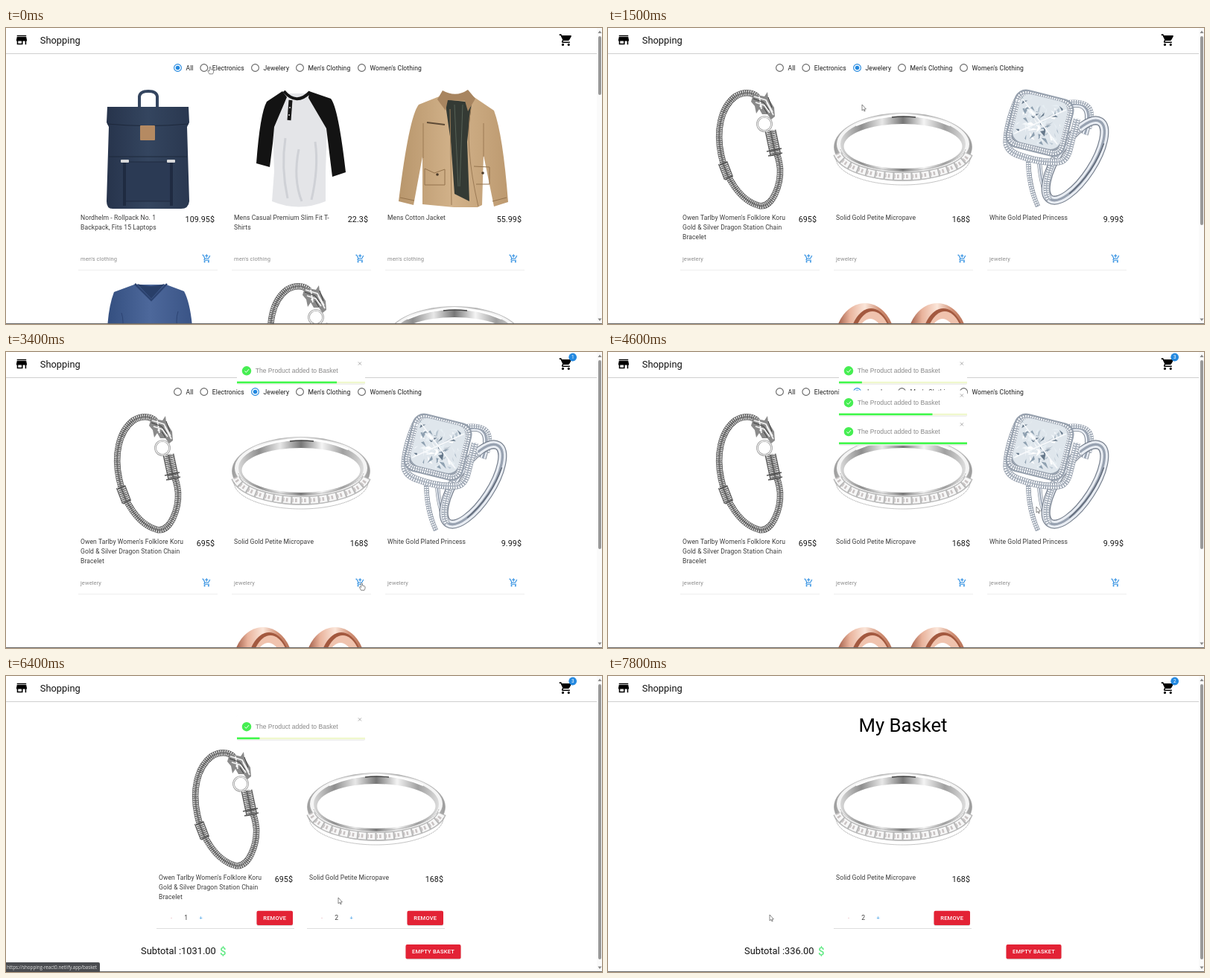
These frames come from a looping animation (800 by 398 pixels, 8000 ms). An HTML page:

```html
<!DOCTYPE html>
<html lang="en">
<head>
<meta charset="utf-8">
<title>Shopping</title>
<style>
html, body { margin: 0; width: 100%; height: 100%; overflow: hidden; background: #fff; }
svg { display: block; width: 800px; height: 398px; font-family: Roboto, sans-serif; }
.b1 { font-size: 8.57px; letter-spacing: .00938em; fill: #3c3c3c; }
.b2 { font-size: 7.5px; letter-spacing: .01071em; fill: #8d8d8d; }
.h6 { font-size: 10.7px; letter-spacing: .0075em; fill: #151515; text-anchor: end; }
.h5 { font-size: 12.86px; fill: #111; }
.h3 { font-size: 25.7px; text-anchor: middle; }
.btn { font-size: 7.5px; font-weight: 500; letter-spacing: .02857em; fill: #fff; text-anchor: middle; }
.toast { font-family: "Liberation Sans", sans-serif; font-size: 8.57px; fill: #8a8a8a; }
.mid { text-anchor: middle; }
</style>
</head>
<body>
<svg id="stage" viewBox="0 0 800 398"></svg>
<script>
const LOOP = 8000, BLUE = '#2489e0';
const stage = document.getElementById('stage');

const text = (x, y, s, cls, more = '') => `<text x="${x}" y="${y}" class="${cls}" ${more}>${s}</text>`;
const rect = (x, y, w, h, fill, r = 0) => `<rect x="${x}" y="${y}" width="${w}" height="${h}" rx="${r}" fill="${fill}"/>`;
const shape = (d, fill) => `<path d="${d}" fill="${fill}"/>`;
const line = (d, color, w = 1, more = '') =>
  `<path d="${d}" fill="none" stroke="${color}" stroke-width="${w}" ${more}/>`;
const dot = (x, y, r, fill, more = '') => `<circle cx="${x}" cy="${y}" r="${r}" fill="${fill}" ${more}/>`;
const oval = (x, y, rx, ry, fill, more = '') =>
  `<ellipse cx="${x}" cy="${y}" rx="${rx}" ry="${ry}" fill="${fill}" ${more}/>`;
const at = (x, y, body, scale = 1) => `<g transform="translate(${x} ${y}) scale(${scale})">${body}</g>`;
const turn = (x, y, deg, body) => `<g transform="translate(${x} ${y}) rotate(${deg})">${body}</g>`;
const use = (id, x, y) => `<use href="#${id}" x="${x}" y="${y}"/>`;
const grad = (id, dir, ...colors) => `<linearGradient id="${id}" ${dir}>` +
  colors.map((c, i) => `<stop offset="${i / (colors.length - 1)}" stop-color="${c}"/>`).join('') + '</linearGradient>';

let seed = 7;
const rnd = () => (seed = seed * 16807 % 2147483647) / 2147483647;

// Small stones, woven chain and polished metal along a path
const pave = (d, w) => line(d, '#8b95a3', w) + line(d, '#f6f8fb', w * .86, 'stroke-dasharray="1.9 1.1"') +
  line(d, '#a7b0bc', w * .16);
const chain = (d, w) => line(d, '#565656', w) + line(d, '#ededed', w * .84, 'stroke-dasharray="1.4 1.2"') +
  line(d, '#555', w * .14) + line(d, '#8a8a8a', w * .5, 'stroke-dasharray=".7 1.9"');
const polish = (d, w) => line(d, '#77808e', w) + line(d, '#e9edf3', w * .8) + line(d, '#98a2b1', w * .28);

// Glittering facets within a square of half size r
const facets = (n, r, colors) => Array.from({ length: n }, () => {
  const p = () => (rnd() - .5) * 15, x = (rnd() * 2 - 1) * r, y = (rnd() * 2 - 1) * r;
  return shape(`M${x} ${y}l${p()} ${p()} ${p()} ${p()}Z`, colors[Math.floor(rnd() * colors.length)]);
}).join('');

const down = 'x2="0" y2="1"';
const defs =
  grad('metal', '', '#9a9a9a', '#f4f4f4', '#c4c4c4', '#fff', '#b5b5b5', '#f2f2f2', '#999') +
  grad('wall', '', '#d8d8d8', '#8e8e8e', '#e8e8e8', '#777', '#f4f4f4', '#a0a0a0', '#ddd') +
  grad('copper', '', '#8f4630', '#e9b39c', '#fbe6da', '#d08e73', '#b06a50') +
  grad('navy', '', '#27344c', '#34455f', '#2a3850') +
  grad('sand', '', '#b8966c', '#d2b28a', '#bd9a70') +
  grad('denim', '', '#344f80', '#4d689b', '#3a5486') +
  grad('coal', 'x2="1" y2="1"', '#37373a', '#2b2b2e', '#232326') +
  grad('dusk', down, '#3f5a7c', '#c2bfc0', '#f2c98a', '#54543c') +
  '<radialGradient id="glow"><stop stop-color="#9be0dc"/><stop offset=".45" stop-color="#2c5758"/><stop offset="1" stop-color="#0c0e10" stop-opacity="0"/></radialGradient>';

// Product pictures, each in a box of 187 x 160
const pics = {
  pack:
    line('M82 24V9Q83 2 94 2T106 9V24', '#34455f', 4) +
    shape('M39 23H148L149 44 146 50 149 150Q148 160 138 160H46Q38 160 38 150L41 50 38 44Z', 'url(#navy)') +
    line('M39 46Q93 51 148 46M41 90H146', '#1d283b') +
    rect(61, 97, 65, 53, '#2b3a54', 3) + line('M61 110V97H126V150H61V120', '#1c273a', .8) +
    line('M62 94V156M125 94V156', '#1f2b41', 4) +
    rect(57, 94, 11, 4, '#d9dadb', 1) + rect(119, 94, 11, 4, '#d9dadb', 1) + rect(83, 48, 20, 20, '#b58a62', 1),
  raglan:
    shape('M69 5L104 5 128 50 126 110 126 150Q90 165 54 150L57 110 55 52Z', '#e4e5e8') +
    line('M72 65Q66 105 75 146M112 70Q117 105 107 148M90 80Q82 120 94 150', '#cfd1d6', 3) +
    shape('M68 2L47 16Q38 32 33 99L51 104 55 72 57 50 74 10Z', '#131313') +
    shape('M104 2L133 12Q143 24 153 111L135 117 127 52 103 11Z', '#131313') +
    line('M70 2Q87 22 105 3', '#151515', 4) + line('M79 14L77 41', '#181818', 5) +
    dot(78, 24, .9, '#eee') + dot(77, 34, .9, '#eee'),
  jacket:
    shape('M75 8L45 20Q32 36 18 150L38 155 50 90V154L92 158H124L130 155 132 88 146 157 165 151Q158 60 146 28L118 9Z', 'url(#sand)') +
    shape('M80 13L116 17 110 70 113 150 93 140 88 70Z', '#343a34') +
    line('M93 20L98 130M104 20L100 130', '#556055', 1) +
    shape('M77 1Q95 11 111 0L121 12 111 29 107 15 84 14 81 28 70 13Z', '#a88560') +
    line('M87 26L89 155M115 25Q106 75 125 157M51 45V92M132 45V90', '#9c7b55') +
    line('M56 44L80 47', '#5d4a36', 2) +
    line('M53 106L66 112 80 107V128H53ZM119 103L140 104V127H122', '#94734d') +
    dot(70, 114, 1.8, '#4a3928') + dot(131, 112, 1.8, '#4a3928') + line('M20 145L39 149M144 150L163 145', '#94734d'),
  tee:
    shape('M75 2L48 12Q41 30 39 60L58 66V160H134V66L153 58Q150 26 142 11L118 2Z', 'url(#denim)') +
    shape('M79 1Q98 7 116 1L98 21Z', '#293f69') + line('M76 1L98 23 119 1', '#2c4370', 2.5) +
    line('M58 40Q62 52 58 66M134 38Q130 50 134 66', '#2d4473'),
  bracelet:
    chain('M104 10C96 2 84 3 74 9 54 24 48 56 55 88 61 118 80 149 106 156 125 159 135 126 134 106 133 96 131 88 127 80', 8.5) +
    chain('M57 98L65 119', 13) + line('M53 101L62 97M60 121L70 116', '#555', 1.5) +
    dot(113, 46, 9.5, 'none', 'stroke="#888" stroke-width="2.6"') + dot(113, 46, 9.5, 'none', 'stroke="#f4f4f4" stroke-width="1.4"') +
    chain('M121 55L128 88', 15) + line('M116 83L136 79M118 89L137 85', '#555', 1.4) +
    shape('M98 6L113 9 117 3 118 11 126 24 127 36 122 40 117 33 110 33 106 26 102 32 100 22 95 16Z', '#8a8a8a') +
    line('M99 9L115 14 124 30M101 17L113 21 120 31M106 9L109 26M116 17L125 34', '#f2f2f2', 1.7) +
    line('M98 12L112 17 119 27M112 24L117 32M118 10L123 24', '#3c3c3c', 1) + dot(108, 22, 1.6, '#fff'),
  ring:
    oval(93, 77, 92.5, 45.5, 'url(#metal)', 'stroke="#aaa" stroke-width=".7"') +
    oval(93, 73, 89, 40, '#f5f5f5') + oval(93, 73, 84, 37, 'url(#wall)') +
    line('M30 48Q93 21 156 48', '#fff', 2) + line('M78 37Q93 35 110 37', '#444', 1.4) +
    oval(93, 76, 79.5, 30, '#fff') +
    line('M5 86A89 36 0 0 0 181 86', '#b9b9b9', 12) +
    line('M5 86A89 36 0 0 0 181 86', '#f7f7f7', 9, 'stroke-dasharray="10 2.2"') +
    line('M5 86A89 36 0 0 0 181 86', '#c9c3c3', 5, 'stroke-dasharray="1.4 2.2 2.6 6"') +
    line('M3 92A90 36 0 0 0 183 92M9 80A85 34 0 0 0 177 80', '#999', 1, 'stroke-dasharray="1.2 .8"'),
  gem:
    polish('M55 92Q56 130 68 157M70 96Q72 128 82 146', 6) + pave('M55 92Q55 130 68 156', 6) +
    polish('M112 20Q146 14 131 60', 9) + pave('M108 17Q150 12 137 52', 6) +
    turn(118, 95, 33, polish('M0-62A24 62 0 0 1 0 62A24 62 0 0 1 0-62', 12) +
      pave('M-18-40Q-34 0-18 40-10 60 0 63', 8) + line('M20-40Q30 0 18 42', '#5d6675', 1.4)) +
    turn(73, 48, 14, pave('M-40-26Q-46 10-40 34Q-36 44-22 46Q10 50 34 42Q44 38 44 22V-20', 9)) +
    turn(71, 43, 14, rect(-41, -38, 82, 80, '#98a2af', 16) +
      pave('M-36-20V24Q-36 37-22 37H22Q36 37 36 24V-20Q36-33 22-33H-22Q-36-33-36-20Z', 7) +
      rect(-33, -33, 66, 66, '#dfe6ec', 14) +
      facets(90, 26, ['#fff', '#f3f7fa', '#b9c6d1', '#8ea0b0', '#66788a', '#e6eef3']) +
      line('M-30-24L0 0 30-24M-30 24L0 0 30 24', '#f8fafc', 1.5)),
  rose: [2, 99].map(x =>
    oval(x + 40, 80, 41, 53, 'url(#copper)') + oval(x + 48, 86, 30, 52, '#a3593f') +
    oval(x + 50, 90, 27, 52, '#f0c3ae') + oval(x + 47, 98, 23, 50, '#fff')).join(''),
  disk:
    rect(35, 0, 116, 158, '#121214', 7) + rect(36, 1, 114, 149, 'url(#coal)', 6) +
    rect(60, 10, 13, 13, '#4c4c4f') + text(60, 30, 'KV Fragment', '', 'font-size="6" font-weight="700" fill="#111"'),
  ssd:
    rect(0, 14, 186, 131, '#2b2829', 4) + rect(3, 24, 9, 82, '#3b3839', 1) + rect(33, 20, 141, 119, '#060606', 1) +
    text(60, 44, 'Torvane', '', 'font-size="6" font-style="italic" fill="#fff"') +
    text(60, 55, 'SSD PEAK', '', 'font-size="13" font-weight="700" font-style="italic" fill="#fff" letter-spacing=".6"') +
    line('M60 63H160', '#a22', .6) +
    text(65, 76, 'Solid State Drive', '', 'font-size="7" letter-spacing=".7" fill="#eee"') + rect(91, 98, 26, 26, '#e5222c'),
  chip:
    rect(0, 16, 187, 128, '#0b0c0e', 5) + dot(56, 68, 46, 'url(#glow)') +
    [0, 1, 2, 3, 4, 5, 6].map(i => {
      const a = i * Math.PI / 3, r = i < 6 ? 19 : 0;
      return at(56 + r * Math.cos(a + .52), 68 + r * Math.sin(a + .52),
        line('M0-10L8.7-5V5L0 10-8.7 5V-5Z', i < 6 ? '#669' : '#bff6dd', 1));
    }).join('') +
    rect(96, 55, 15, 15, '#f2f2f2') +
    text(92, 76, 'SOLID STATE DRIVE', '', 'font-size="5" letter-spacing="1" fill="#ddd"') +
    text(94, 87, 'B37', '', 'font-size="8" fill="#eee" letter-spacing=".6"') + rect(115, 81, 20, 5, '#777', 2) +
    [9, 24, 39, 51, 64, 77, 90, 102].map(x => rect(x - 4, 112, 8, 8, '#d5d5d5')).join('') +
    rect(110, 108, 74, 16, '#f3f3f3') + text(128, 118, '256', '', 'font-size="10" font-weight="700"') +
    text(138, 123, 'GB', '', 'font-size="5"'),
  drive:
    rect(43, 0, 30, 160, '#5447b5', 8) + rect(49, 0, 96, 160, '#252629', 8) + rect(52, 3, 90, 150, '#313236', 6) +
    line('M52 50L98 3M60 90L142 10M80 110L142 48', '#292a2e', 6),
  screen:
    rect(0, 9, 187, 110, '#111') + rect(3, 12, 181, 104, 'url(#dusk)') +
    oval(45, 23, 35, 5, '#e3d3c8') + oval(120, 20, 42, 5, '#5d7190') + oval(88, 34, 28, 4, '#f7dfae') +
    shape('M3 48L24 35 40 42 62 36 88 48 116 31 131 22 146 33 165 28 184 42V62H3Z', '#46506a') +
    shape('M116 34L131 22 140 34 132 31ZM158 32L166 28 175 36Z', '#d5d7df') + rect(3, 52, 181, 64, '#3a3f35') +
    dot(93, 43, 5, '#ffe49a'),
  curve:
    shape('M0 13Q93 24 187 13V160H0Z', '#050506') + line('M0 13Q93 24 187 13', '#333', 1) +
    shape('M75 55Q80 38 91 33L87 55Z', '#2d2d31') +
    text(8, 29, 'ORVANTA', '', 'font-size="4.5" font-weight="700" fill="#e8e8e8"')
};

const plusCart = line('M1 3H3.6L7.8 12H15.6Q16.3 12 16.7 11.3L20.5 4.5M7.4 12L6.1 14.4Q5.5 16 7 16H19M12 1V9M8 5H16', BLUE, 2) +
  dot(7, 20, 2, BLUE) + dot(17, 20, 2, BLUE);
const cart = shape('M1 2H4.3L5.2 4H20.5Q22.3 4 21.6 5.6L18 12Q17.3 13 16 13H8L7 15H19V17H7Q4.2 16.6 5.3 14L6.6 11.6 3 4H1Z', '#000') +
  dot(7, 20, 2, '#000') + dot(17, 20, 2, '#000');
const shop = '<path fill-rule="evenodd" d="M4 4H20V6H4ZM4 7H20L21 12V14H20V20H18V14H14V20H4V14H3V12ZM6 14V18H12V14Z"/>';

const item = (pic, price, cat, ...lines) => ({ pic, price, cat, lines });
const dragon = item('bracelet', 695, 'jewelery', "Owen Tarlby Women's Folklore Koru", 'Gold &amp; Silver Dragon Station Chain', 'Bracelet');
const band = item('ring', 168, 'jewelery', 'Solid Gold Petite Micropave');
const columns = [97, 303, 509];

const label = (it, x, y) => use(it.pic, x, y - 175) +
  it.lines.map((s, i) => text(x + 3, y + i * 12.86, s, 'b1')).join('') + text(x + 183, y + 3.3, it.price + '$', 'h6');
const card = (it, i) => label(it, columns[i], 258) + text(columns[i] + 3, 312.6, it.cat, 'b2') +
  at(columns[i] + 165.8, 303.6, plusCart, .536) + rect(columns[i], 325, 187, 1, '#eee');

const filters = [['All', 230.5], ['Electronics', 265.8], ['Jewelery', 334.5], ["Men's Clothing", 394.5], ["Women's Clothing", 477.5]];
const list = (chosen, items, more) =>
  filters.map(([name, x], i) => {
    const on = i === chosen, c = on ? BLUE : '#666';
    return dot(x, 53.5, 4.9, 'none', `stroke="${c}" stroke-width="1.1"`) + (on ? dot(x, 53.5, 2.8, c) : '') +
      text(x + 11, 56.6, name, 'b1', 'style="fill:#1c1c1c"');
  }).join('') + items.map(card).join('') + more.map((id, i) => id && use(id, columns[i], 343)).join('');

const button = (x, y, w, s) => rect(x, y + 1, w, 19.3, '#d8d8d8', 2) + rect(x, y, w, 19.3, '#e32235', 2) + text(x + w / 2, y + 12.4, s, 'btn');
const row = (it, n, x) => label(it, x, 274) + rect(x, 339, 185, 1, '#ddd') +
  text(x + 20, 327.6, '-', 'b2 mid', 'style="fill:#e3a5ac"') + text(x + 39.7, 328, n, 'b1 mid') +
  text(x + 59.7, 327.6, '+', 'b2 mid', 'style="fill:#4aa3e8"') + button(x + 134.5, 315.8, 48.5, 'REMOVE');
const basket = (x, sum, dollar, rows) => text(396, 75.3, 'My Basket', 'h3') + rows +
  text(x, 374, 'Subtotal :' + sum, 'h5') +
  text(dollar, 374.5, '$', 'mid', 'font-size="15" font-weight="500" fill="#66ea88"') +
  button(717.5 - x, 361, 74, 'EMPTY BASKET');

// start, end of scroll thumb, content
const pages = [
  [0, 90, list(0, [
    item('pack', 109.95, "men's clothing", 'Nordhelm - Rollpack No. 1', 'Backpack, Fits 15 Laptops'),
    item('raglan', 22.3, "men's clothing", 'Mens Casual Premium Slim Fit T-', 'Shirts'),
    item('jacket', 55.99, "men's clothing", 'Mens Cotton Jacket')], ['tee', 'bracelet', 'ring'])],
  [200, 265, list(1, [
    item('disk', 64, 'electronics', 'KV 2TB Fragment Portable External', 'Hard Drive - USB 3.0'),
    item('ssd', 109, 'electronics', 'Torvane SSD PEAK 1TB Internal SSD -', 'SATA III 6 Gb/s'),
    item('chip', 109, 'electronics', 'Granite Pulse 256GB SSD 3D NAND', 'B37 SLC Cache Performance Boost', 'SATA III 2.5')],
    ['drive', 'screen', 'curve'])],
  [1000, 265, list(2, [dragon, band, item('gem', 9.99, 'jewelery', 'White Gold Plated Princess')], ['', 'rose'])],
  [5850, 381, basket(181, '1031.00', 291.3, row(dragon, 1, 202) + row(band, 2, 404))],
  [7600, 381, basket(183, '336.00', 286.3, row(band, 2, 303))]
];

const toast = rect(310, 9.5, 172, 34.3, '#e9e9e9', 2) + rect(310, 8.5, 172, 34, '#fff', 2) +
  dot(323, 25.3, 6.2, '#46ee52') + line('M320.4 25.5L322.4 27.4 326 23.2', '#fff', 1) +
  text(334.7, 28.3, 'The Product added to Basket', 'toast') + line('M472.8 13.4L477 17.6M477 13.4L472.8 17.6', '#999', .8) +
  rect(310, 39.8, 172, 2.4, '#f0f8cd') + `<rect class="bar" x="310" y="39.6" height="2.6" fill="#40f84c"/>`;

stage.innerHTML = `<defs>${defs}${Object.keys(pics).map(k => `<g id="${k}">${pics[k]}</g>`).join('')}</defs>` +
  rect(0, 0, 800, 398, '#fff') + pages.map(p => `<g class="page">${p[2]}</g>`).join('') +
  rect(0, 0, 793, 34, '#fff') + rect(0, 34, 793, 1, '#cfcfcf') +
  at(11.6, 6.6, shop, .78) + text(45.8, 20.9, 'Shopping', 'h5') + at(742, 6.8, cart, .78) +
  `<g id="badge">${dot(760.7, 7, 5.4, BLUE)}${text(760.7, 9.4, '', 'mid', 'id="count" font-size="6.4" fill="#fff"')}</g>` +
  rect(793, 0, 7, 398, '#fafafa') + shape('M794.5 7L797 3.5 799.5 7ZM794.5 390.5L797 394 799.5 390.5Z', '#888') +
  '<rect id="thumb" x="795" y="11" width="4" rx="2" fill="#989898"/>' + rect(0, 397, 800, 1, '#686868') +
  [0, 1, 2].map(() => `<g class="note">${toast}</g>`).join('') +
  `<g id="link">${rect(-2, 385, 128, 15, '#4a4c50', 2)}${text(1, 393.8, 'https://shopping-react0.netlify.app/basket', '',
    'font-size="6.2" fill="#e4e4e4" font-family="Open Sans, sans-serif"')}</g>` +
  `<g id="pointer" fill="#fff" stroke="#555" stroke-width=".7" stroke-linejoin="round">
    <path d="M0 0V8L1.8 6.4 3 9 4.2 8.5 3 6H5.4Z"/>
    <path d="M-.9.8Q0-.6.9.8V3.6Q4.6 3.8 4.6 5.5 4.7 8 3.5 9.8H-1Q-2.6 7-3.2 5.6-2.4 4.6-.9 6Z"/></g>`;

const $ = id => document.getElementById(id);
const pageEls = [...stage.querySelectorAll('.page')], notes = [...stage.querySelectorAll('.note')];
const [arrow, hand] = $('pointer').children;
const show = (el, on) => el.style.display = on ? '' : 'none';
const clamp = v => Math.min(1, Math.max(0, v));
const easeOut = p => 1 - (1 - p) ** 3, smooth = p => p * p * (3 - 2 * p);

// Value at time t in a table of [time, ...values]
function tween(table, t, ease) {
  let i = 0;
  while (i < table.length - 2 && t >= table[i + 1][0]) i++;
  const a = table[i], b = table[i + 1], p = ease(clamp((t - a[0]) / (b[0] - a[0])));
  return a.slice(1).map((v, k) => v + (b[k + 1] - v) * p);
}

const path = [[0, 274, 52], [300, 274, 52], [700, 351, 54], [1150, 351, 54], [1500, 341, 103], [2100, 269, 310],
  [2600, 269, 310], [3250, 477.5, 310.5], [4230, 477.5, 310.5], [4600, 575, 208], [5150, 750, 16], [5900, 750, 16],
  [6400, 446, 298], [7250, 220, 321], [7600, 220, 321], [7800, 217, 321]];
const hover = [[0, 420], [600, 1200], [2050, 2700], [3150, 4280], [5100, 5900], [7200, 7650]];
const within = (t, [a, b]) => t >= a && t < b;

const adds = [2320, 3420, 4115], MOVE = 640, STAY = 2000, FOLD = 300;
const dropIn = [[0, -1608, 0], [.6, 13.4, 1], [.75, -5.4, 1], [.9, 2.7, 1], [1, 0, 1]];
const flyOut = [[0, 0, 1], [.2, -5.4, 1], [.4, 10.7, 1], [.45, 10.7, 1], [1, -1072, 0]];

function drawNotes(t) {
  let slot = 0;
  adds.forEach((start, i) => {
    const barAt = start + MOVE, end = barAt + STAY, gone = end + MOVE;
    const [dy, alpha] = t < end ? tween(dropIn, (t - start) / MOVE, easeOut) : tween(flyOut, (t - end) / MOVE, easeOut);
    show(notes[i], t >= start && t < gone);
    notes[i].setAttribute('transform', `translate(0 ${slot + dy})`);
    notes[i].setAttribute('opacity', alpha);
    notes[i].querySelector('.bar').setAttribute('width', 172 * (1 - clamp((t - barAt) / STAY)));
    slot += 42.9 * (1 - smooth(clamp((t - gone) / FOLD)));
  });
}

function draw(t) {
  const now = pages.filter(p => t >= p[0]).length - 1;
  pageEls.forEach((el, i) => show(el, i === now));
  $('thumb').setAttribute('height', pages[now][1] - 11);
  const count = now === 4 ? 2 : adds.filter(a => t >= a).length;
  show($('badge'), count);
  $('count').textContent = count;
  show($('link'), within(t, [5150, 6480]));
  drawNotes(t);
  const [x, y] = tween(path, t, smooth), over = hover.some(h => within(t, h));
  $('pointer').setAttribute('transform', `translate(${x} ${y})`);
  show(arrow, !over);
  show(hand, over);
}

const begin = performance.now();
function tick() {
  draw((performance.now() - begin) % LOOP);
  requestAnimationFrame(tick);
}
tick();
</script>
</body>
</html>
```
